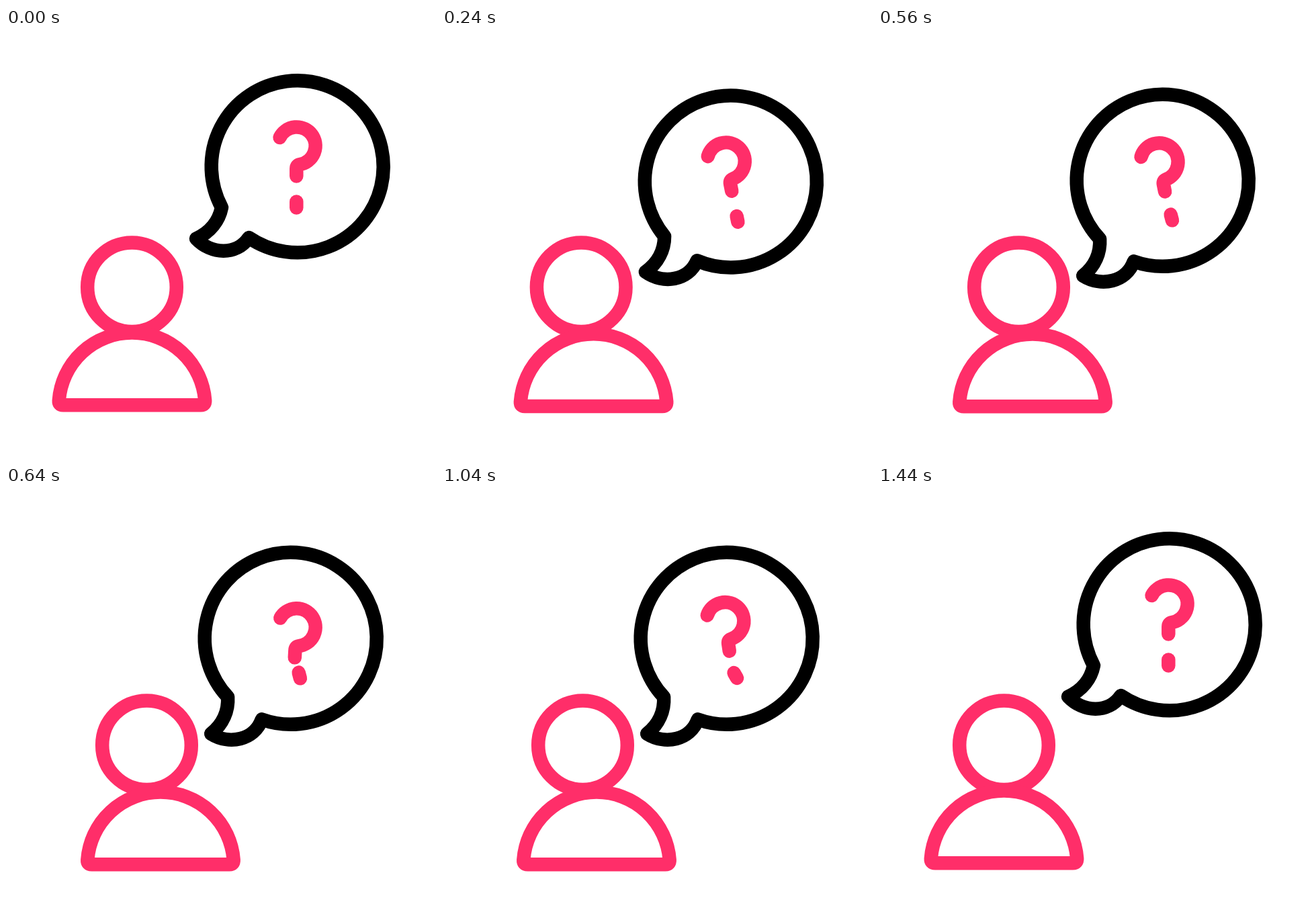
An HTML page with a canvas that plays this animation: 640 by 640 pixels, repeating every 1480 ms.

```html
<!DOCTYPE html>
<html lang="en">
<head>
<meta charset="utf-8">
<title>Person asking a question</title>
<style>
  html, body { margin: 0; width: 100%; height: 100%; overflow: hidden; background: #fff; }
  canvas { display: block; width: 640px; height: 640px; }
</style>
</head>
<body>
<canvas id="stage" width="640" height="640"></canvas>
<script>
const ctx = document.getElementById('stage').getContext('2d');
const PINK = '#ff2e69', BLACK = '#000';
const LOOP = 1480, STEP = 40;

const progress = (t, from, to) => Math.min(1, Math.max(0, (t - from) / (to - from)));

function ease(t, from, to) {
  const x = progress(t, from, to);
  return x * x * (3 - 2 * x);
}

// Eases in, holds, and eases back until the given end.
const visit = (t, end) => ease(t, 80, 280) - ease(t, 1080, end);

// Swings out to 1 and back to 0, once per beat.
const nod = (t, from, to, beats) => Math.sin(Math.PI * beats * progress(t, from, to)) ** 2;

const head = new Path2D();
head.arc(187.5, 385.7, 66.3, 0, 2 * Math.PI);

const body = new Path2D(
  'M85 561.3 Q78.4 561.3 78.8 554.5 A109 109 0 0 1 296.2 554.5 Q296.6 561.3 290 561.3 Z');

const bubble = new Path2D(
  'M321 267 A128 128 0 1 1 361.5 312 C343 339 305 337 283 313.5 C304 304 317 287 321 267 Z');

const hook = new Path2D(
  'M407.5 163 A28 28 0 1 1 437.4 203 Q432.3 204 432.3 209.5 V220.5');

const dot = new Path2D('M432.3 258.5 V267.5');

function stroke(path, color) {
  ctx.strokeStyle = color;
  ctx.stroke(path);
}

function rotateAbout(x, y, degrees) {
  ctx.translate(x, y);
  ctx.rotate(degrees * Math.PI / 180);
  ctx.translate(-x, -y);
}

function group(transform, paint) {
  ctx.save();
  transform();
  paint();
  ctx.restore();
}

function draw(t) {
  const step = visit(t, 1296), lift = visit(t, 1320);
  const tilt = 21.6 * nod(t, 209, 528, 1) - 14.7 * step;

  ctx.fillStyle = '#fff';
  ctx.fillRect(0, 0, 640, 640);
  ctx.lineWidth = 20.5;
  ctx.lineCap = ctx.lineJoin = 'round';

  group(() => {
    ctx.translate(22.3 * lift, 55.2 * lift);
    rotateAbout(283, 314, tilt);
  }, () => {
    stroke(bubble, BLACK);
    group(() => rotateAbout(385, 228, 19.2 * nod(t, 520, 1095, 2)), () => stroke(hook, PINK));
    group(() => rotateAbout(432.3, 263, -16 * nod(t, 640, 1200, 2)), () => stroke(dot, PINK));
  });

  group(() => ctx.translate(22 * step, 0), () => stroke(head, PINK));
  group(() => ctx.translate(42.5 * step, 2 * step), () => stroke(body, PINK));
}

const start = performance.now();
function tick() {
  const t = (performance.now() - start) % LOOP;
  draw(Math.floor(t / STEP) * STEP);
  requestAnimationFrame(tick);
}
tick();
</script>
</body>
</html>
```
